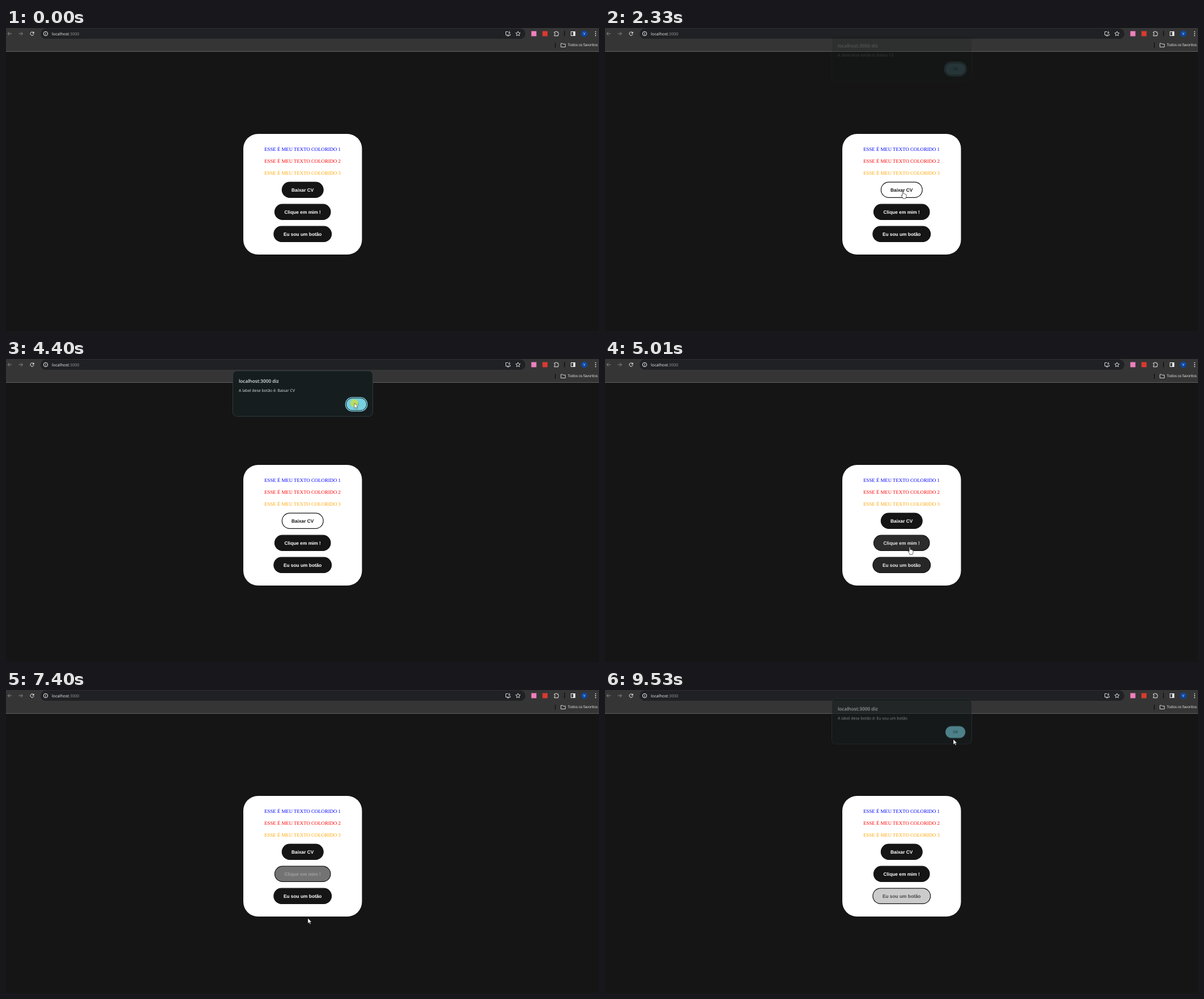
Recreate the animation shown at these times as an HTML page. Size 1047 px wide and 535 px high, loop 9.6 s.

```html
<!DOCTYPE html>
<html lang="pt-BR">
<head>
<meta charset="utf-8">
<title>Botões</title>
<style>
html, body { margin: 0; width: 100%; height: 100%; overflow: hidden; background: #151515; }
svg { display: block; width: 1047px; height: 535px; }
text { font-family: "Open Sans", "Noto Sans", sans-serif; text-rendering: geometricPrecision; }
.line { fill: none; stroke: #d6d6d6; stroke-width: 1; }
.dim { stroke: #8a8a8a; }
.lit { stroke: #f2f2f2; }
.row { font: 8.8px "Liberation Serif", "Times New Roman", serif; text-anchor: middle; }
.btn text { font: bold 8.33px "Liberation Sans", Arial, sans-serif; text-anchor: middle; fill: #fff; }
.btn rect { fill: #151515; stroke: #151515; stroke-width: 1.2; }
.msg { font-size: 6.9px; fill: #dfe5e6; }
</style>
</head>
<body>
<svg viewBox="0 0 1047 535">
  <rect width="1047" height="535" fill="#151515"/>

  <g id="toolbar">
    <rect width="1047" height="41" fill="#353535"/>
    <rect y="41" width="1047" height="1" fill="#606060"/>
    <rect x="61" y=".7" width="856" height="18.4" rx="9.2" fill="#202124"/>
    <path class="line dim" d="M10 10H3.2M6.2 6.8L3 10L6.2 13.2M22.5 10H29.3M26.3 6.8L29.5 10L26.3 13.2"/>
    <path class="line lit" d="M48.6 8.2A3.1 3.1 0 1 0 49.1 10.8"/>
    <path fill="#f2f2f2" d="M49.6 6.2V9.6H46.2Z"/>
    <circle class="line lit" cx="70" cy="10" r="3.7"/>
    <path class="line lit" d="M70 9.4V12M70 7.7V8.6"/>
    <text x="81" y="12.5" font-size="7.2" fill="#f1f1f1">localhost<tspan fill="#979797">:3000</tspan></text>
    <path class="line" d="M886.5 6.5H882.5V12.5H890.5V10.8M884.5 14H888.5M888.7 5.5V9.6M886.9 8L888.7 9.8L890.5 8"/>
    <path id="star" class="line"/>
    <rect x="927.5" y="5.5" width="9" height="9" fill="#ee80bd"/>
    <rect x="947.2" y="5.5" width="9" height="9" fill="#d93a30"/>
    <path class="line lit" d="M968.2 7H970.2Q971.4 4.2 972.6 7H974.8V9.2Q977.6 10.4 974.8 11.6V13.8H968.2V11.8Q971.4 10.4 968.2 9Z"/>
    <rect x="985.5" y="5" width="1.4" height="9.5" fill="#111"/>
    <rect class="line lit" x="997.7" y="6.5" width="7" height="7"/>
    <rect x="1001.5" y="6.5" width="3.4" height="7" fill="#f2f2f2"/>
    <circle cx="1021" cy="10" r="5.6" fill="#0d47a1"/>
    <text x="1021" y="12.2" font-size="5.8" fill="#fff" text-anchor="middle">V</text>
    <path stroke="#f2f2f2" stroke-width="1.8" stroke-linecap="round" d="M1041 6.6h0M1041 10h0M1041 13.4h0"/>
    <rect x="969.2" y="26" width="1.3" height="9" fill="#111"/>
    <path class="line" d="M979.8 27.2H982.6L983.6 28.3H987.6V33.6H979.8Z"/>
    <text x="992" y="32.4" font-size="6.5" letter-spacing="-.13" fill="#f1f1f1">Todos os favoritos</text>
  </g>

  <rect x="419" y="187" width="209.5" height="213" rx="26" fill="#fff"/>
  <text class="row" x="523.6" y="216.5" fill="#00f">ESSE É MEU TEXTO COLORIDO 1</text>
  <text class="row" x="523.6" y="237.5" fill="#f00">ESSE É MEU TEXTO COLORIDO 2</text>
  <text class="row" x="523.6" y="258.5" fill="#ffa500">ESSE É MEU TEXTO COLORIDO 3</text>
  <g class="btn"><rect x="487.4" y="272.1" width="72.8" height="27.2" rx="13.6"/><text x="523.7" y="288.7">Baixar CV</text></g>
  <g class="btn"><rect x="474.5" y="311.2" width="98.5" height="27.2" rx="13.6"/><text x="523.7" y="327.8">Clique em mim !</text></g>
  <g class="btn"><rect x="472.9" y="350.2" width="101.7" height="27.2" rx="13.6"/><text x="523.7" y="366.9">Eu sou um botão</text></g>

  <g id="dialog">
    <rect x="400.5" y="21" width="247" height="80.3" rx="7" fill="#161d1f" stroke="#303a3d"/>
    <text x="411" y="41.6" font-size="8.25" font-weight="600" fill="#e6eaeb">localhost:3000 diz</text>
    <text class="msg" x="411" y="57.8">A label dese botão é: Baixar CV</text>
    <text class="msg" x="411" y="57.8">A label dese botão é: Clique em mim !</text>
    <text class="msg" x="411" y="57.8">A label dese botão é: Eu sou um botão</text>
    <rect id="ring" x="599.4" y="67.9" width="38.4" height="24.2" rx="12.1" fill="none" stroke="#84d6e5" stroke-width="1.3"/>
    <rect x="601" y="69.5" width="35.3" height="21" rx="10.5" fill="#78d1e0"/>
    <text x="618.7" y="82.4" font-size="6.5" fill="#14363d" text-anchor="middle">OK</text>
  </g>

  <g id="cursor">
    <circle id="press" r="7" fill="#c6e052"/>
    <path id="arrow" fill="#fff" stroke="#111" stroke-width=".5" d="M0 0V9.2L2.2 7.2L3.7 10.6L5.2 10L3.7 6.7H6.6Z"/>
    <path id="hand" fill="#fff" stroke="#222" stroke-width=".7" d="M-.9 1Q0 -1 .9 1V4.6Q2 3.6 2.7 5Q4 4.2 4.5 5.6Q6 5.2 6 7V9.5Q6 11 5 12V13.2H0V12L-2.9 8.2Q-2.8 5.4 -.9 8Z"/>
    <path id="beam" fill="none" stroke="#ddd" stroke-width=".9" d="M-1.8 -4.5H1.8M0 -4.5V4.5M-1.8 4.5H1.8"/>
  </g>
</svg>
<script>
const LOOP = 9600;
const $ = id => document.getElementById(id);

// rows: [ms, value]; hard rows hold their value until the next one
function play(el, prop, rows, hard) {
  const all = rows.slice();
  if (all[0][0] > 0) all.unshift([0, all[0][1]]);
  const last = all[all.length - 1];
  if (last[0] < LOOP) all.push([LOOP, last[1]]);
  const easing = hard ? 'steps(1, end)' : 'linear';
  el.animate(all.map(([t, v]) => ({ offset: t / LOOP, [prop]: v, easing })),
    { duration: LOOP, iterations: Infinity });
}

// Visible only inside the given [from, to] spans
const during = (el, spans, alpha = 1) =>
  play(el, 'opacity', [[0, 0], ...spans.flatMap(([a, b]) => [[a, alpha], [b, 0]])], true);

const tips = Array.from({ length: 10 }, (_, i) => {
  const r = i % 2 ? 2 : 4.3, a = i * Math.PI / 5;
  return `${904 + r * Math.sin(a)} ${10.2 - r * Math.cos(a)}`;
});
$('star').setAttribute('d', `M${tips.join('L')}Z`);

// Button hover: 0 is dark, 1 is light
const buttons = document.querySelectorAll('.btn');
const shade = p => {
  const c = Math.round(21 + 234 * p);
  return `rgb(${c}, ${c}, ${c})`;
};
function hover(i, rows) {
  const [box, label] = buttons[i].children;
  play(box, 'fill', rows.map(([t, p]) => [t, shade(p)]));
  play(label, 'fill', rows.map(([t, p]) => [t, shade(1 - p)]));
}
hover(0, [[1620, 0], [1850, 1], [4440, 1], [4700, 0]]);
hover(1, [[4990, 0], [5200, 1], [7225, 1], [7520, 0]]);
hover(2, [[4900, 0], [4960, .15], [5060, 0], [7700, 0], [7930, 1], [9460, 1], [LOOP, .56]]);

// Dialog: each pair is the start of opening and of closing
const shows = [[2270, 4440], [5220, 7040], [8020, 9470]];
const fade = [], slide = [];
const add = (t, alpha, y) => {
  fade.push([t, alpha]);
  slide.push([t, `translate(0px, ${y}px)`]);
};
for (const [open, close] of shows) {
  add(open, 0, -9);
  add(open + 60, .17, -7.7);
  add(open + 190, 1, 0);
  add(close, 1, 0);
  add(close + 60, .58, -5.7);
  if (close + 170 > LOOP) add(LOOP, .2, -8);
  else add(close + 170, 0, -9);
}
play($('dialog'), 'opacity', fade);
play($('dialog'), 'transform', slide);
during($('ring'), shows.map(([open, close]) => [open, close + 10]));
document.querySelectorAll('.msg').forEach((msg, i) =>
  during(msg, [[shows[i][0], i < 2 ? shows[i + 1][0] : LOOP]]));

// Pointer path, built from moves and rests
const path = [];
const go = (t, x, y, until) => {
  const v = `translate(${x}px, ${y}px)`;
  path.push([t, v]);
  if (until) path.push([until, v]);
};
const goOk = (t, until) => go(t, 615, 78, until);

go(130, 953, 488);
go(330, 544, 307, 530);
go(620, 600, 310);
go(740, 636, 214);
go(900, 456, 214);
go(960, 387, 190);
go(1040, 456, 234);
go(1180, 591, 235);
go(1250, 600, 255);
go(1390, 456, 255);
go(1530, 480, 268);
go(1800, 526, 288, 2500);
go(2900, 414, 36);
go(3200, 480, 38);
go(3350, 414, 56);
go(3900, 508, 56, 4050);
goOk(4250, 4470);
go(4760, 596, 300);
go(4900, 568, 355);
go(5010, 538, 332, 5290);
go(5460, 536, 156);
go(5700, 481, 58);
go(5950, 489, 58, 6060);
go(6330, 632, 60);
go(6480, 513, 57);
go(6540, 519, 57, 6680);
goOk(6880, 7040);
go(7330, 533, 405);
go(7400, 533, 403, 7600);
go(7760, 527, 364, 8060);
go(8400, 555, 84, 8560);
go(8600, 561, 88, 8800);
goOk(9100, 9460);
go(9530, 615, 87);
play($('cursor'), 'transform', path);

// Pointer shapes: the arrow fills every gap
const beams = [[780, 902], [1040, 1180], [1260, 1400], [3330, 4080], [5680, 6200], [6440, 6700]];
const hands = [[1620, 2540], [4900, 5300], [7710, 8080]];
const busy = [...beams, ...hands].sort((a, b) => a[0] - b[0]);
const starts = [130, ...busy.map(s => s[1])];
during($('beam'), beams);
during($('hand'), hands);
during($('arrow'), starts.map((t, i) => [t, busy[i] ? busy[i][0] : LOOP]));
play($('beam'), 'stroke', [[0, '#222'], [2000, '#ddd']], true);

const clicks = [2130, 4340, 5110, 6930, 7920, 9350];
during($('press'), clicks.map(t => [t, t + 110]), .85);
</script>
</body>
</html>
```
